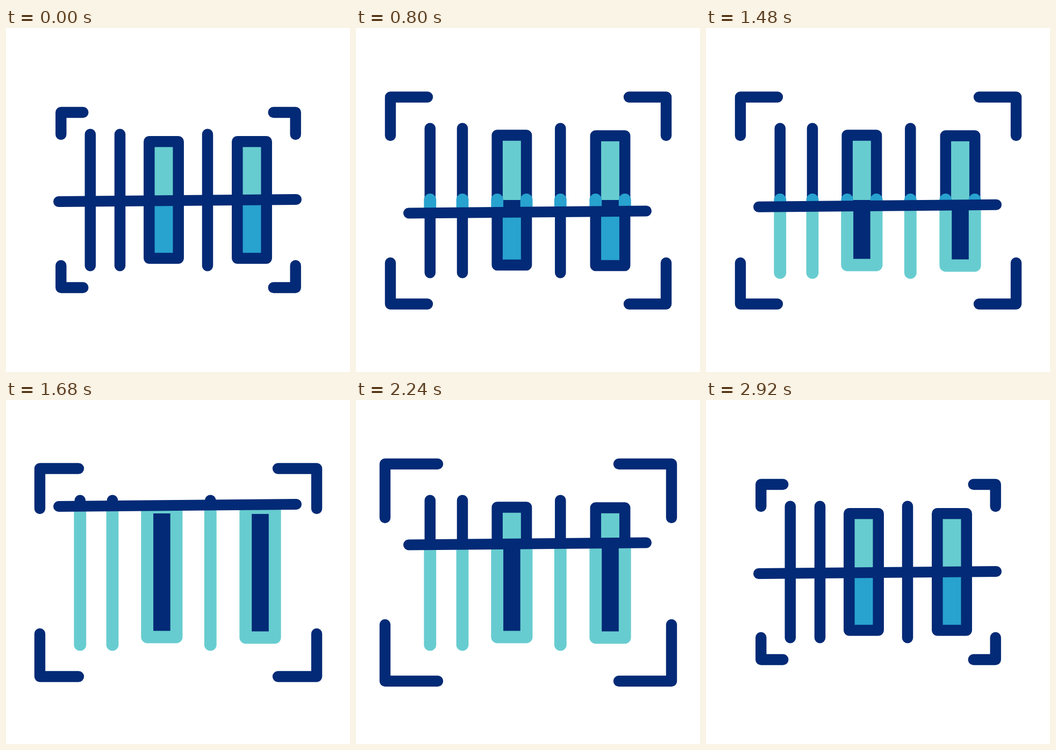
An HTML page with a canvas that plays this animation: 640 by 640 pixels, repeating every 3000 ms.

```html
<!DOCTYPE html>
<html lang="en">
<head>
<meta charset="utf-8">
<title>Scan</title>
<style>
html, body { margin: 0; width: 100%; height: 100%; overflow: hidden; background: #fff; }
canvas { display: block; }
</style>
</head>
<body>
<canvas id="stage" width="640" height="640"></canvas>
<script>
const ctx = document.getElementById('stage').getContext('2d');
const NAVY = '#032a76', TEAL = '#67ccd0', BLUE = '#28a2cf';
const LOOP = 3000, STEP = 40, MIDDLE = 321, RECT_WIDTH = 54.4;

const mix = (a, b, p) => a + (b - a) * p;
const mixAll = (a, b, p) => a.map((v, i) => mix(v, b[i], p));

function ease(t, start, end) {
  const u = Math.min(1, Math.max(0, (t - start) / (end - start)));
  return u * u * (3 - 2 * u);
}

// Corner states: x, top y, bottom y, arm width, top arm height, bottom arm height
const SMALL = [102.3, 157, 483, 41, 41, 41];
const OPEN = [64, 128.5, 513.5, 69, 71.5, 76.5];
const WIDE = [54, 119, 523, 98, 100, 105];

// Positions at rest and spread out
const BARS = [[156.8, 137.8], [212, 198], [375, 380.3]];
const RECTS = [[266.3, 262.7, 0], [430.3, 445.8, 1]];

function stroke(color, width, points) {
  ctx.strokeStyle = color;
  ctx.lineWidth = width;
  ctx.beginPath();
  points.forEach(([x, y]) => ctx.lineTo(x, y));
  ctx.stroke();
}

function fill(color, x, top, bottom) {
  ctx.fillStyle = color;
  ctx.fillRect(x, top, RECT_WIDTH, bottom - top);
}

// Draws inside the half of the stage that a slanted edge at y cuts off
function beyondEdge(y, limit, draw) {
  ctx.save();
  ctx.beginPath();
  ctx.moveTo(0, y + 2.9);
  ctx.lineTo(640, y - 2.9);
  ctx.lineTo(640, limit);
  ctx.lineTo(0, limit);
  ctx.clip();
  draw();
  ctx.restore();
}

function drawCorners(t) {
  let s = mixAll(SMALL, OPEN, ease(t, 120, 720));
  s = mixAll(s, WIDE, ease(t, 1600, 2000));
  s = mixAll(s, SMALL, ease(t, 2283, 2551));
  const [left, top, bottom, arm, topArm, bottomArm] = s;
  for (const flip of [x => x, x => 641 - x]) {
    for (const [y, yEnd] of [[top, top + topArm], [bottom, bottom - bottomArm]]) {
      stroke(NAVY, 20.4, [[flip(left + arm), y], [flip(left), y], [flip(left), yEnd]]);
    }
  }
}

function drawCode(spread, color, width, upper, lower, fromMiddle) {
  const split = 320;
  const barTop = fromMiddle ? 319.5 : mix(197.8, 186.8, spread);
  const barBottom = mix(442.2, 455.2, spread);
  for (const [rest, open] of BARS) {
    const x = mix(rest, open, spread);
    stroke(color, width, [[x, barTop], [x, barBottom]]);
  }
  for (const [rest, open, drop] of RECTS) {
    const x = mix(rest, open, spread), right = x + RECT_WIDTH;
    const top = fromMiddle ? 319.5 : mix(211.2, 199.5 + drop, spread);
    const bottom = mix(428.6, 441 + drop, spread);
    if (!fromMiddle) fill(upper, x, top, split);
    fill(lower, x, split, bottom);
    const outline = [[x, top], [x, bottom], [right, bottom], [right, top]];
    if (!fromMiddle) outline.push([x, top], [x, bottom]);
    stroke(color, width, outline);
  }
}

function render(t) {
  const spread = ease(t, 120, 720) - ease(t, 2370, 2910);
  const down = mix(MIDDLE, 460, ease(t, 655, 1240));
  const up = mix(down, 185, ease(t, 1240, 1740));
  const line = mix(up, MIDDLE, ease(t, 2000, 2420));
  const wipe = mix(up, 470, ease(t, 2000, 2640));

  ctx.fillStyle = '#fff';
  ctx.fillRect(0, 0, 640, 640);
  ctx.lineCap = ctx.lineJoin = 'round';

  drawCorners(t);
  drawCode(spread, NAVY, 20.5, TEAL, BLUE, false);
  if (t > 655 && t < 1740) {
    beyondEdge(line, 0, () => drawCode(spread, BLUE, 22.8, NAVY, NAVY, true));
  }
  if (t > 1240 && t < 2640) {
    beyondEdge(wipe, 640, () => drawCode(spread, TEAL, 22.8, NAVY, NAVY, false));
  }
  stroke(NAVY, 20, [[98, line + 2], [540, line - 2]]);
}

function tick() {
  const t = performance.now() % LOOP;
  render(Math.floor(t / STEP) * STEP);
  requestAnimationFrame(tick);
}
tick();
</script>
</body>
</html>
```
